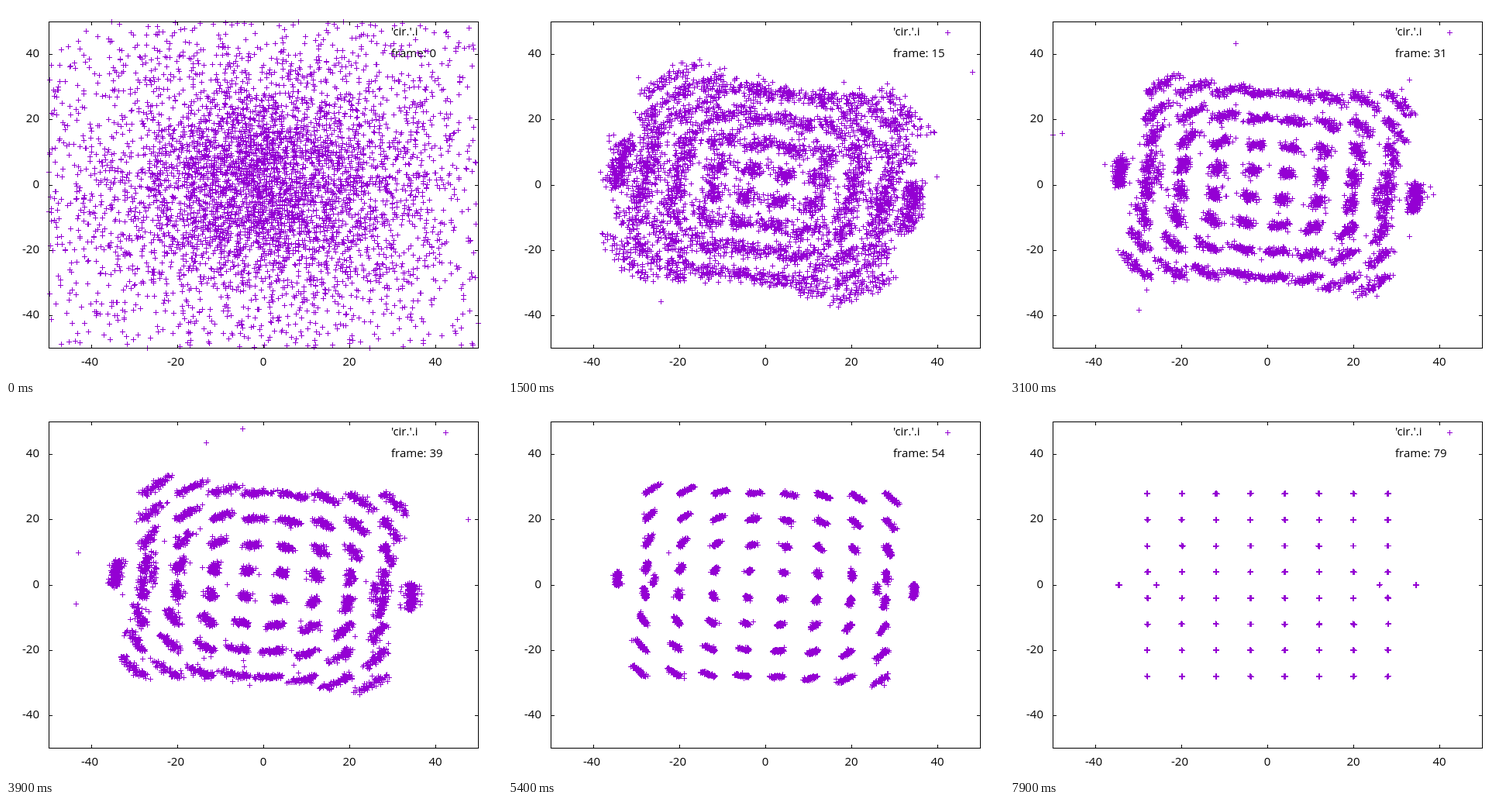
An HTML page with a canvas that plays this animation: 640x480 px, repeating every 8000 ms.

```html
<!DOCTYPE html>
<html lang="en">
<head>
<meta charset="utf-8">
<title>Scatter plot</title>
<style>
  html, body { margin: 0; width: 100%; height: 100%; overflow: hidden; background: #fff; }
  canvas { display: block; }
</style>
</head>
<body>
<canvas id="plot" width="640" height="480"></canvas>
<script>
const ctx = document.getElementById("plot").getContext("2d");
const LEFT = 55, RIGHT = 609, TOP = 20, BOTTOM = 441;
const STEP = 100, STEPS = 80;
const TICKS = [-40, -20, 0, 20, 40];

// How the swarm settles, by step
const KEYS = [0, 7, 15, 31, 47, 63, 79];
const SPREAD = [1.9, 1.8, 1.25, 0.72, 0.38, 0.11, 0.045];
const TWIST = [0.05, 0.15, 0.4, 0.23, 0.2, 0, 0];
const STRAY = [0, 0.002, 0.003, 0.003, 0.003, 0, 0];

const toX = x => Math.round(332 + x * 5.54);
const toY = y => Math.round(230.5 - y * 4.21);

function generator(seed) {
  return () => {
    seed = (seed + 0x6D2B79F5) | 0;
    let t = Math.imul(seed ^ (seed >>> 15), 1 | seed);
    t = (t + Math.imul(t ^ (t >>> 7), 61 | t)) ^ t;
    return ((t ^ (t >>> 14)) >>> 0) / 4294967296;
  };
}

// A pair of normally distributed values
function normal(rand, size) {
  const r = size * Math.sqrt(-2 * Math.log(1 - rand()));
  const a = rand() * 2 * Math.PI;
  return [r * Math.cos(a), r * Math.sin(a)];
}

function at(values, step) {
  let i = 0;
  while (i < KEYS.length - 2 && step > KEYS[i + 1]) i++;
  const part = (step - KEYS[i]) / (KEYS[i + 1] - KEYS[i]);
  return values[i] + (values[i + 1] - values[i]) * part;
}

const points = [];
const setup = generator(11);
function addCluster(x, y, count) {
  for (let i = 0; i < count; i++) {
    const start = normal(setup, setup() < 0.36 ? 15 : 32);
    points.push({ x, y, start, lag: setup() ** 1.3 });
  }
}
for (let x = -28; x <= 28; x += 8)
  for (let y = -28; y <= 28; y += 8) addCluster(x, y, 80);
for (const side of [-1, 1]) {
  addCluster(side * 34.6, 0, 250);
  addCluster(side * 26, 0, 35);
}

function cross(x, y) {
  ctx.fillRect(x - 3, y, 7, 1);
  ctx.fillRect(x, y - 3, 1, 7);
}

function drawPoints(step) {
  const rand = generator(step * 7919 + 5);
  const spread = at(SPREAD, step), twist = at(TWIST, step), stray = at(STRAY, step);
  const scatter = Math.exp(-step / 1.6);
  ctx.fillStyle = "#9400d3";
  cross(567, 34);
  for (const p of points) {
    const turn = twist * p.lag, cos = Math.cos(turn), sin = Math.sin(turn);
    const odds = rand();
    const size = odds < stray ? 20 : odds > 0.93 ? spread * 2 : spread;
    const [dx, dy] = normal(rand, size);
    const homeX = p.x * cos + p.y * sin + dx;
    const homeY = p.y * cos - p.x * sin + dy * 0.85;
    const x = toX(homeX + (p.start[0] - homeX) * scatter);
    const y = toY(homeY + (p.start[1] - homeY) * scatter);
    if (x >= LEFT && x <= RIGHT && y >= TOP && y <= BOTTOM) cross(x, y);
  }
}

function drawText(step) {
  ctx.fillStyle = "#000";
  ctx.font = '15px "Open Sans", "Noto Sans", sans-serif';
  ctx.textAlign = "left";
  ctx.fillText("'cir.'.i", 497, 38);
  ctx.fillText("frame: " + step, 497, 66);
  for (const v of TICKS) {
    ctx.textAlign = "center";
    ctx.fillText(v, toX(v) - (v < 0 ? 2 : 0), 464);
    ctx.textAlign = "right";
    ctx.fillText(v, 43, toY(v) + 4);
  }
}

function drawAxes() {
  ctx.strokeStyle = ctx.fillStyle = "#000";
  ctx.strokeRect(LEFT + 0.5, TOP + 0.5, RIGHT - LEFT, BOTTOM - TOP);
  for (const v of TICKS) {
    const x = toX(v), y = toY(v);
    ctx.fillRect(x, TOP, 1, 5);
    ctx.fillRect(x, BOTTOM - 4, 1, 5);
    ctx.fillRect(LEFT, y, 5, 1);
    ctx.fillRect(RIGHT - 4, y, 5, 1);
  }
}

let shown = -1;
const begin = performance.now();
function tick() {
  const step = Math.floor((performance.now() - begin) / STEP) % STEPS;
  if (step !== shown) {
    shown = step;
    ctx.fillStyle = "#fff";
    ctx.fillRect(0, 0, 640, 480);
    drawText(step);
    drawPoints(step);
    drawAxes();
  }
  requestAnimationFrame(tick);
}
tick();
</script>
</body>
</html>
```
